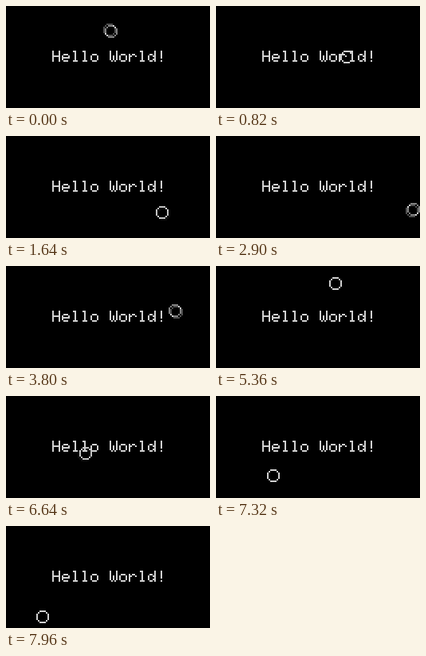
An HTML page with a canvas for the animation above (8000 ms loop, 256 by 128 pixels).

```html
<!DOCTYPE html>
<html lang="en">
<head>
<meta charset="utf-8">
<title>Hello World</title>
<style>
  html, body { margin: 0; width: 100%; height: 100%; overflow: hidden; background: #000; }
  canvas { display: block; width: 256px; height: 128px; image-rendering: pixelated; }
</style>
</head>
<body>
<canvas width="256" height="128" role="img" aria-label="Hello World!"></canvas>
<script>
const LOOP = 8000, TICK = 20, STEP = 50;
const DOT = 2, COLS = 128, ROWS = 64, SIZE = 8;
const START = { x: 61, y: 11 }, TEXT = { x: 29, y: 28, advance: 6 };
const INK = '#d0d0d0';

// Dot-matrix letters, one string per row
const GLYPHS = {
  H: '#...# #...# #...# ##### #...# #...# #...#',
  e: '..... ..... .###. #...# ##### #.... .###.',
  l: '.##.. ..#.. ..#.. ..#.. ..#.. ..#.. .###.',
  o: '..... ..... .###. #...# #...# #...# .###.',
  W: '#...# #...# #...# #.#.# #.#.# #.#.# .#.#.',
  r: '..... ..... #.##. ##..# #.... #.... #....',
  d: '....# ....# .##.# #..## #...# #..## .##.#',
  '!': '..#.. ..#.. ..#.. ..#.. ..#.. ..... ..#..',
};
const RING = '..####.. .#....#. #......# #......# #......# #......# .#....#. ..####..';

const ctx = document.querySelector('canvas').getContext('2d');

function drawDots(pattern, x, y) {
  pattern.split(' ').forEach((row, j) => [...row].forEach((dot, i) => {
    if (dot === '#') ctx.fillRect((x + i) * DOT, (y + j) * DOT, DOT, DOT);
  }));
}

// Position after a distance travelled between two walls
function bounce(distance, max) {
  const d = distance % (2 * max);
  return d > max ? 2 * max - d : d;
}

function drawRing(step, weight) {
  ctx.globalAlpha = weight;
  drawDots(RING, bounce(START.x + step, COLS - SIZE), bounce(START.y + step, ROWS - SIZE));
}

function render(time) {
  const t = Math.min(Math.floor((time % LOOP) / TICK) * TICK, LOOP - 2 * TICK);
  const step = 1 + Math.floor(t / STEP), phase = t % STEP;
  // Neighbouring positions show through around the moment of a step
  const previous = phase === 0 ? 0.38 : 0, next = phase === 40 ? 0.07 : 0;

  ctx.globalCompositeOperation = 'source-over';
  ctx.globalAlpha = 1;
  ctx.fillStyle = '#000';
  ctx.fillRect(0, 0, COLS * DOT, ROWS * DOT);

  ctx.fillStyle = INK;
  ctx.globalCompositeOperation = 'lighter';
  drawRing(step - 1, previous);
  drawRing(step, 1 - previous - next);
  drawRing(step + 1, next);

  ctx.globalCompositeOperation = 'source-over';
  ctx.globalAlpha = 1;
  [...'Hello World!'].forEach((char, i) => {
    if (GLYPHS[char]) drawDots(GLYPHS[char], TEXT.x + i * TEXT.advance, TEXT.y);
  });
}

function frame(now) {
  render(now);
  requestAnimationFrame(frame);
}
requestAnimationFrame(frame);
</script>
</body>
</html>
```
